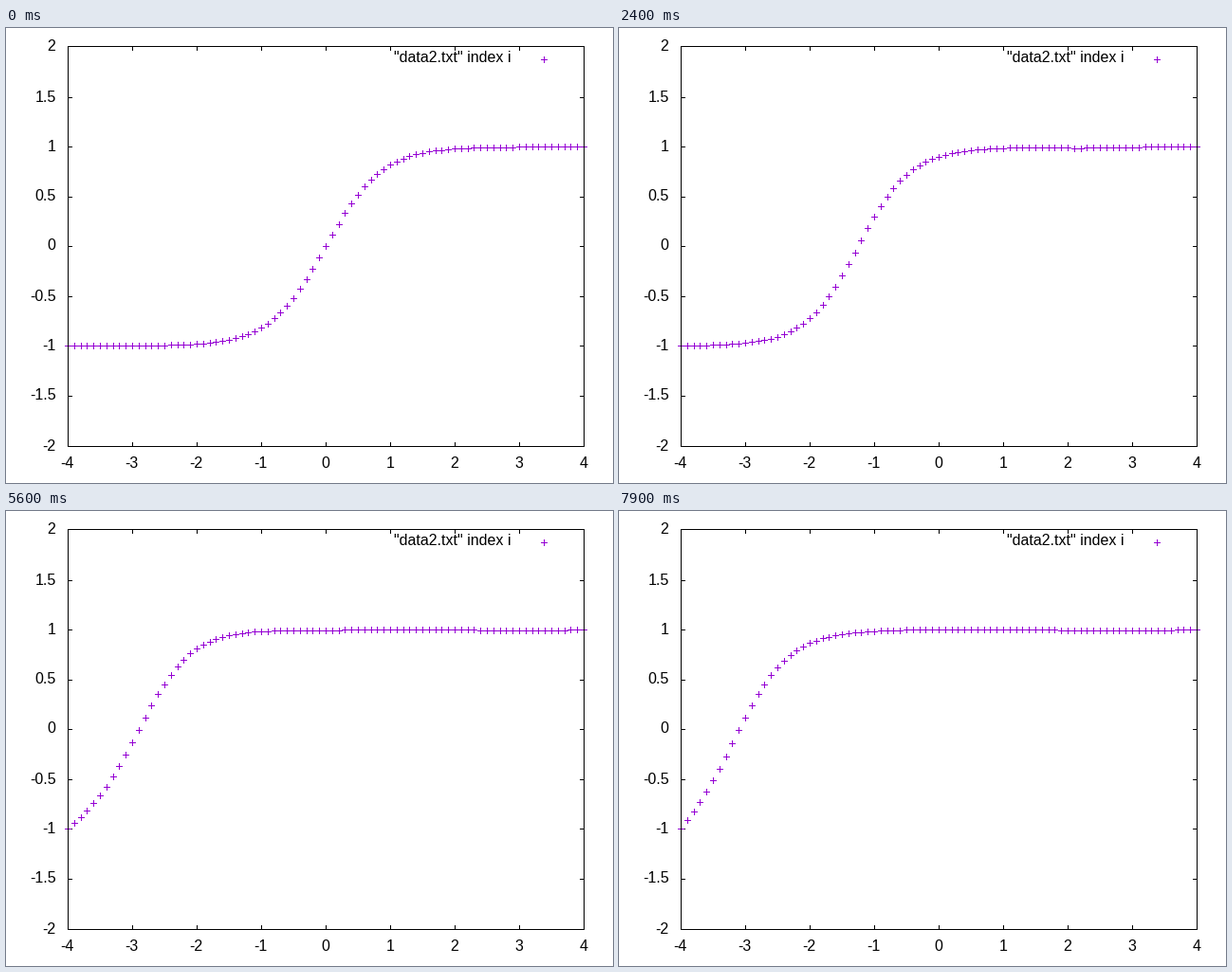
A matplotlib script that plays this animation: 640x480 px, repeating every 8000 ms.

```python
import numpy as np
import matplotlib.pyplot as plt
from matplotlib.animation import FuncAnimation
from matplotlib.collections import LineCollection

W, H, DPI = 640, 480, 100
FRAMES, INTERVAL = 80, 100
LEFT, RIGHT, TOP, BOTTOM = 65, 609, 19, 441
X0, X_UNIT = 337.5, 68
Y0, Y_UNIT = 230.76, 105
PX = 72 / DPI
PURPLE = "#9400d3"

# Moving kink of the phi^4 field, ends held fixed
V, GAMMA = 0.5, 1.15
DX, DT, SUBSTEPS = 0.1, 0.01, 10
x = np.linspace(-4, 4, 81)


def accel(u):
    a = np.zeros_like(u)
    a[1:-1] = (u[2:] - 2 * u[1:-1] + u[:-2]) / DX**2
    a[1:-1] += 2 * u[1:-1] * (1 - u[1:-1] ** 2)
    return a


def solve():
    u = np.tanh(GAMMA * x)
    u[0], u[-1] = -1, 1
    ut = GAMMA * V / np.cosh(x) ** 2
    ut[[0, -1]] = 0
    states = [u.copy()]
    for _ in range(FRAMES - 1):
        for _ in range(SUBSTEPS):
            ut += accel(u) * DT / 2
            u += ut * DT
            ut += accel(u) * DT / 2
        states.append(u.copy())
    return states


def to_px(v):
    return np.floor(X0 + X_UNIT * v)


def to_py(v):
    return np.floor(Y0 - Y_UNIT * v)


def hline(x0, x1, y):
    return [(x0 - 0.5, y), (x1 + 0.5, y)]


def vline(px, y0, y1):
    return [(px, y0 - 0.5), (px, y1 + 0.5)]


def plus(px, py):
    return [hline(px - 3, px + 3, py), vline(px, py - 3, py + 3)]


def pluses(u):
    return [s for px, py in zip(to_px(x), to_py(u)) for s in plus(px, py)]


fig = plt.figure(figsize=(W / DPI, H / DPI), dpi=DPI, facecolor="white")
ax = fig.add_axes([0, 0, 1, 1])
ax.set_xlim(-0.5, W - 0.5)
ax.set_ylim(H - 0.5, -0.5)
ax.axis("off")


def add_lines(segs, color, z):
    lines = LineCollection(segs, colors=color, linewidths=PX, capstyle="butt",
                           antialiaseds=False, zorder=z)
    lines.set_snap(False)
    return ax.add_collection(lines, autolim=False)


def label(px, py, s, ha):
    ax.text(px, py, s, ha=ha, va="baseline", family="Liberation Sans",
            size=16 * PX, color="black")


steps = np.arange(-4, 5)
cols, rows = to_px(steps), to_py(steps / 2)
rows[0], rows[-1] = BOTTOM, TOP
ticks = []
for k, px, py in zip(steps, cols, rows):
    ticks += [vline(px, TOP, TOP + 4), vline(px, BOTTOM - 4, BOTTOM),
              hline(LEFT, LEFT + 4, py), hline(RIGHT - 4, RIGHT, py)]
    label(px - (1 if k < 0 else 0.5), 464, str(k), "center")
    label(52, py + 4, f"{k / 2:g}", "right")
label(532, 36, '"data2.txt" index i', "right")

border = [hline(LEFT, RIGHT, TOP), hline(LEFT, RIGHT, BOTTOM),
          vline(LEFT, TOP, BOTTOM), vline(RIGHT, TOP, BOTTOM)]
states = solve()
add_lines(ticks, "black", 1)
add_lines(plus(567, 33), PURPLE, 2)
curve = add_lines(pluses(states[0]), PURPLE, 3)
add_lines(border, "black", 4)


def update(i):
    curve.set_segments(pluses(states[i]))
    return [curve]


anim = FuncAnimation(fig, update, frames=FRAMES, interval=INTERVAL,
                     repeat=True, repeat_delay=0)
plt.show()
```
